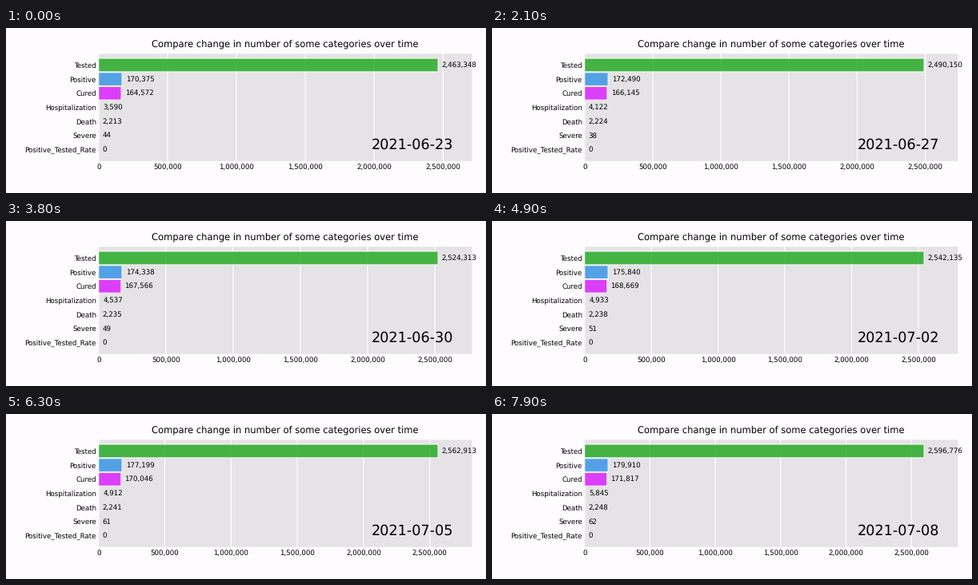
A matplotlib script for the animation above (8000 ms loop, 600 by 207 pixels).

```python
import matplotlib.pyplot as plt
import numpy as np
from matplotlib.animation import FuncAnimation
from matplotlib.ticker import MultipleLocator, StrMethodFormatter

plt.rcParams.update({"font.family": "DejaVu Sans", "text.hinting": "none"})

# At 72 dpi one point equals one pixel.
W, H, DPI = 600, 207, 72
LEFT, RIGHT, TOP, BOTTOM = 115.7, 582.5, 32.3, 166.8
STEPS_PER_DAY = 5
FRAMES, INTERVAL = 80, 100
LABEL_SIZE = 8.65
START = np.datetime64("2021-06-23")

# Bottom to top: label, bar colour, totals at the key days.
KEY_DAYS = [0, 2, 4.2, 7.6, 9.8, 12.6, 15.8]
SERIES = [
    ("Positive_Tested_Rate", "#b68100", [0] * 7),
    ("Severe", "#222a2a", [44, 38, 38, 49, 51, 61, 62]),
    ("Death", "#fb0d0d", [2213, 2218, 2224, 2235, 2238, 2241, 2248]),
    ("Hospitalization", "#e15f99", [3590, 3970, 4122, 4537, 4933, 4912, 5845]),
    ("Cured", "#da16ff",
     [164572, 165319, 166145, 167566, 168669, 170046, 171817]),
    ("Positive", "#2e91e5",
     [170375, 171507, 172490, 174338, 175840, 177199, 179910]),
    ("Tested", "#1ca71c",
     [2463348, 2480169, 2490150, 2524313, 2542135, 2562913, 2596776]),
]
names, colors, totals = zip(*SERIES)
rows = np.arange(1, len(SERIES) + 1)

fig = plt.figure(figsize=(W / DPI, H / DPI), dpi=DPI, facecolor="#fefcfe")
ax = fig.add_axes([LEFT / W, 1 - BOTTOM / H,
                   (RIGHT - LEFT) / W, (BOTTOM - TOP) / H])
ax.set_facecolor("#e5e3e5")
ax.patch.set_snap(False)
ax.spines[:].set_visible(False)
ax.set_axisbelow(True)
ax.set_ylim(0.2, len(SERIES) + 0.8)
ax.set_yticks(rows, names)
ax.xaxis.set_major_locator(MultipleLocator(500_000))
ax.xaxis.set_major_formatter(StrMethodFormatter("{x:,.0f}"))
ax.tick_params(length=0, labelsize=LABEL_SIZE)
ax.tick_params(axis="x", pad=3.4)
ax.tick_params(axis="y", pad=2.8)
ax.grid(True, axis="x", color="white", linewidth=1.2, snap=False)

fig.text((LEFT + RIGHT) / 2 / W, 1 - 24 / H,
         "Compare change in number of some categories over time",
         size=11.55, ha="center", va="baseline")
date = ax.text(0.95, 0.15, "", transform=ax.transAxes, size=17.6,
               ha="right", va="center")
bars = ax.barh(rows, np.zeros(len(rows)), height=0.95, color=colors,
               edgecolor="white", linewidth=1.2, alpha=0.8, snap=False)
values = [ax.text(0, y, "", size=LABEL_SIZE, ha="left", va="center")
          for y in rows]


def update(i):
    day = i / STEPS_PER_DAY
    lengths = [np.interp(day, KEY_DAYS, t) for t in totals]
    xmax = 1.1 * max(lengths)
    ax.set_xlim(0, xmax)
    for bar, label, n in zip(bars, values, lengths):
        bar.set_width(n)
        label.set_x(n + 0.01 * xmax)
        label.set_text(f"{n:,.0f}")
    date.set_text(str(START + i // STEPS_PER_DAY))
    return [*bars, *values, date]


anim = FuncAnimation(fig, update, frames=FRAMES, interval=INTERVAL,
                     repeat=True, repeat_delay=0, blit=False)
plt.show()
```
